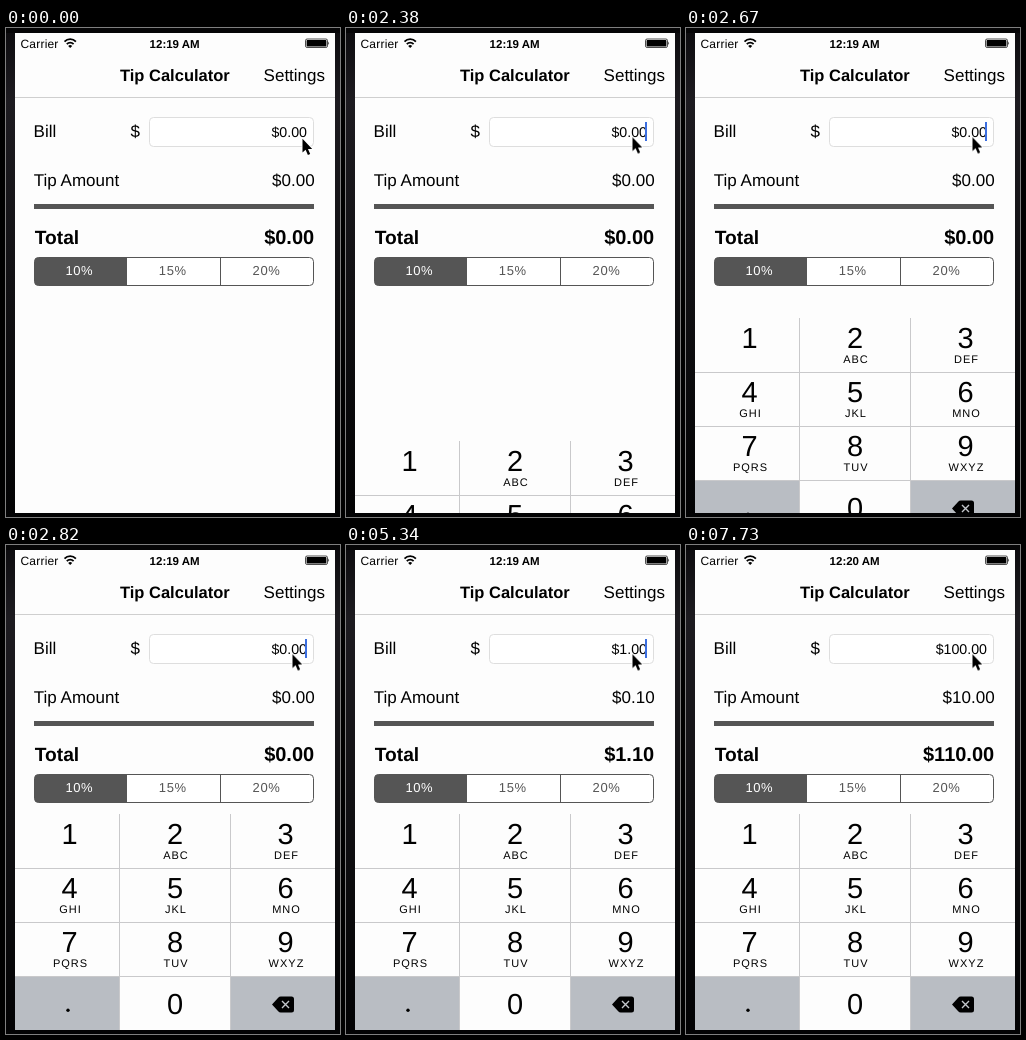
Write an HTML page that moves like this. It is 334x489 px and loops after 8 s.

```html
<!DOCTYPE html>
<html lang="en">
<head>
<meta charset="utf-8">
<title>Tip Calculator</title>
<style>
  html, body { margin: 0; width: 100%; height: 100%; overflow: hidden; background: #000; }
  svg { display: block; width: 334px; height: 489px; }
  text { font: 17px "Liberation Sans", Arial, sans-serif; fill: #000; text-rendering: geometricPrecision; }
  .end { text-anchor: end; }
  .status { font-size: 12px; letter-spacing: .2px; }
  .clock { font-size: 11.5px; font-weight: bold; }
  .title { font-size: 16.5px; font-weight: bold; }
  .field { font-size: 14.2px; }
  .total { font-size: 20px; font-weight: bold; }
  .seg text { font-size: 13px; letter-spacing: .6px; fill: #555; }
  .seg .on { fill: #fff; }
  .digit { font-size: 29px; text-anchor: middle; }
  .letters { font-size: 11px; letter-spacing: 1px; text-anchor: middle; }

  #caret, #pad, #mouse { animation: 8s step-end infinite; }
  #caret { animation-name: blink; }
  #pad { animation-name: rise; }
  #mouse { animation-name: move; }

  @keyframes move {
    0% { transform: translate(296px, 110px); }
    1.75% { transform: translate(293px, 113px); }
    3.625% { transform: translate(288px, 116px); }
    5.5% { transform: translate(285px, 117px); }
    20.5% { transform: translate(291px, 116.5px); }
    24.125%, 100% { transform: translate(286px, 108.5px); }
  }
  /* critically damped slide, seen at a low frame rate */
  @keyframes rise {
    0% { transform: translateY(216px); }
    29.75% { transform: translateY(144px); }
    31.625% { transform: translateY(21px); }
    33.5% { transform: translateY(2px); }
    35.25%, 100% { transform: none; }
  }
  @keyframes blink {
    0%, 38.875%, 49.875%, 85.375%, 96.625%, 100% { opacity: 0; }
    29.75%, 42.5%, 55.5%, 76%, 87.25% { opacity: 1; }
    37.125%, 48.125%, 74.25%, 83.5%, 94.75% { opacity: .5; }
  }
</style>
</head>
<body>
<svg viewBox="0 0 334 489">
  <defs>
    <linearGradient id="desk" x1="0" y1="0" x2="0" y2="1">
      <stop offset="0" stop-color="#0c0b0e"/>
      <stop offset=".15" stop-color="#1d1b20"/>
      <stop offset=".5" stop-color="#121114"/>
      <stop offset="1" stop-color="#020203"/>
    </linearGradient>
    <clipPath id="screen"><rect x="9" y="5" width="320" height="480"/></clipPath>
  </defs>
  <rect width="334" height="489" fill="url(#desk)"/>
  <rect width="334" height="5" fill="#050506"/>
  <rect x="9" y="5" width="320" height="480" fill="#fdfdfd"/>

  <text class="status" x="14.5" y="19.5">Carrier</text>
  <g fill="none" stroke="#000" stroke-width="1.8">
    <path d="M58.5 13.6a8 8 0 0 1 11.4 0"/>
    <path d="M60.8 16.1a4.8 4.8 0 0 1 6.8 0"/>
  </g>
  <path d="M64.2 20l-2-2.1a2.9 2.9 0 0 1 4 0z"/>
  <text class="clock" id="clock" x="143.6" y="19.5">12:19 AM</text>
  <rect x="299.5" y="11" width="22" height="8.5" rx="1.6" fill="#fff" stroke="#000" stroke-width=".7"/>
  <rect x="300.6" y="12.1" width="19.8" height="6.3" rx=".6"/>
  <path d="M322.4 13.6q1.4 1.6 0 3.3z"/>

  <text class="title" x="114" y="53">Tip Calculator</text>
  <text x="257.6" y="53">Settings</text>
  <rect x="9" y="69" width="320" height="1" fill="#cfcfcf"/>

  <text x="27.6" y="109">Bill</text>
  <text x="124.6" y="109">$</text>
  <rect x="143.5" y="89.5" width="164" height="29" rx="4" fill="#fff" stroke="#dedede"/>
  <text class="field end" id="bill" x="301" y="108.5">$0.00</text>
  <rect id="caret" x="299" y="94" width="2" height="19" fill="#3c6fe0"/>

  <text x="27.8" y="158">Tip Amount</text>
  <text class="end" id="tip" x="308.6" y="158">$0.00</text>
  <rect x="28" y="176" width="280" height="5" fill="#555"/>
  <text class="total" x="28.8" y="216" style="font-size:19.2px">Total</text>
  <text class="total end" id="total" x="308.2" y="216">$0.00</text>

  <g class="seg">
    <rect x="28.5" y="229.5" width="279" height="28" rx="4" fill="#fff" stroke="#555"/>
    <path d="M121 229.5H32.5a4 4 0 0 0-4 4v20a4 4 0 0 0 4 4H121z" fill="#555"/>
    <path d="M214.5 229.5v28" stroke="#555"/>
    <text class="on" x="59.4" y="247.3">10%</text>
    <text x="152.8" y="247.3">15%</text>
    <text x="246.6" y="247.3">20%</text>
  </g>

  <g clip-path="url(#screen)">
    <g id="pad">
      <rect x="9" y="269" width="320" height="216" fill="#fdfdfd"/>
      <path d="M9 431h104.5v54H9zM224.5 431H329v54H224.5z" fill="#b9bdc3"/>
      <path d="M9 323.5h320M9 377.5h320M9 431.5h320M113.5 269v216M224.5 269v216" stroke="#c9c9cb" fill="none"/>
      <g id="keys"></g>
      <circle cx="62" cy="465.2" r="1.7"/>
      <path d="M266 459.5l6.2-6.8q1-1.2 2.6-1.2h10.7q2.5 0 2.5 2.5v11q0 2.5-2.5 2.5h-10.7q-1.6 0-2.6-1.2z"/>
      <path d="M276 456l7 7m0-7l-7 7" stroke="#c3c6cb" stroke-width="1.4"/>
    </g>
  </g>

  <path id="mouse" d="M.5 .8V14.6L3.6 11.8L5.9 17L8.2 16L6 10.9H10.2z" stroke="#fff" stroke-width="1.6" paint-order="stroke"/>
</svg>
<script>
  const LOOP = 8000;
  const get = id => document.getElementById(id);
  const money = cents => "$" + (cents / 100).toFixed(2);

  // keypad
  const columns = [63.5, 169, 279.5];
  const letters = ["", "ABC", "DEF", "GHI", "JKL", "MNO", "PQRS", "TUV", "WXYZ"];
  const label = (cls, x, y, str) => `<text class="${cls}" x="${x}" y="${y}">${str}</text>`;
  get("keys").innerHTML = letters.map((word, i) => {
    const x = columns[i % 3], y = 299 + 54 * Math.floor(i / 3);
    return label("digit", x, y, i + 1) + label("letters", x + 1, y + 15, word);
  }).join("") + label("digit", 169, 468.5, 0);

  // moments at which another digit is typed: [ms, bill in cents]
  const typed = [[0, 0], [4590, 1], [5040, 10], [5340, 100], [6080, 1000], [6980, 10000]];

  function show(id, str) {
    const el = get(id);
    if (el.textContent !== str) el.textContent = str;
  }

  let start;
  function draw(now) {
    start ??= now;
    const t = (now - start) % LOOP;
    const bill = typed.filter(step => step[0] <= t).pop()[1];
    const tip = Math.round(bill * 0.1);
    show("bill", money(bill));
    show("tip", money(tip));
    show("total", money(bill + tip));
    show("clock", t < 6080 ? "12:19 AM" : "12:20 AM");
    requestAnimationFrame(draw);
  }
  requestAnimationFrame(draw);
</script>
</body>
</html>
```
